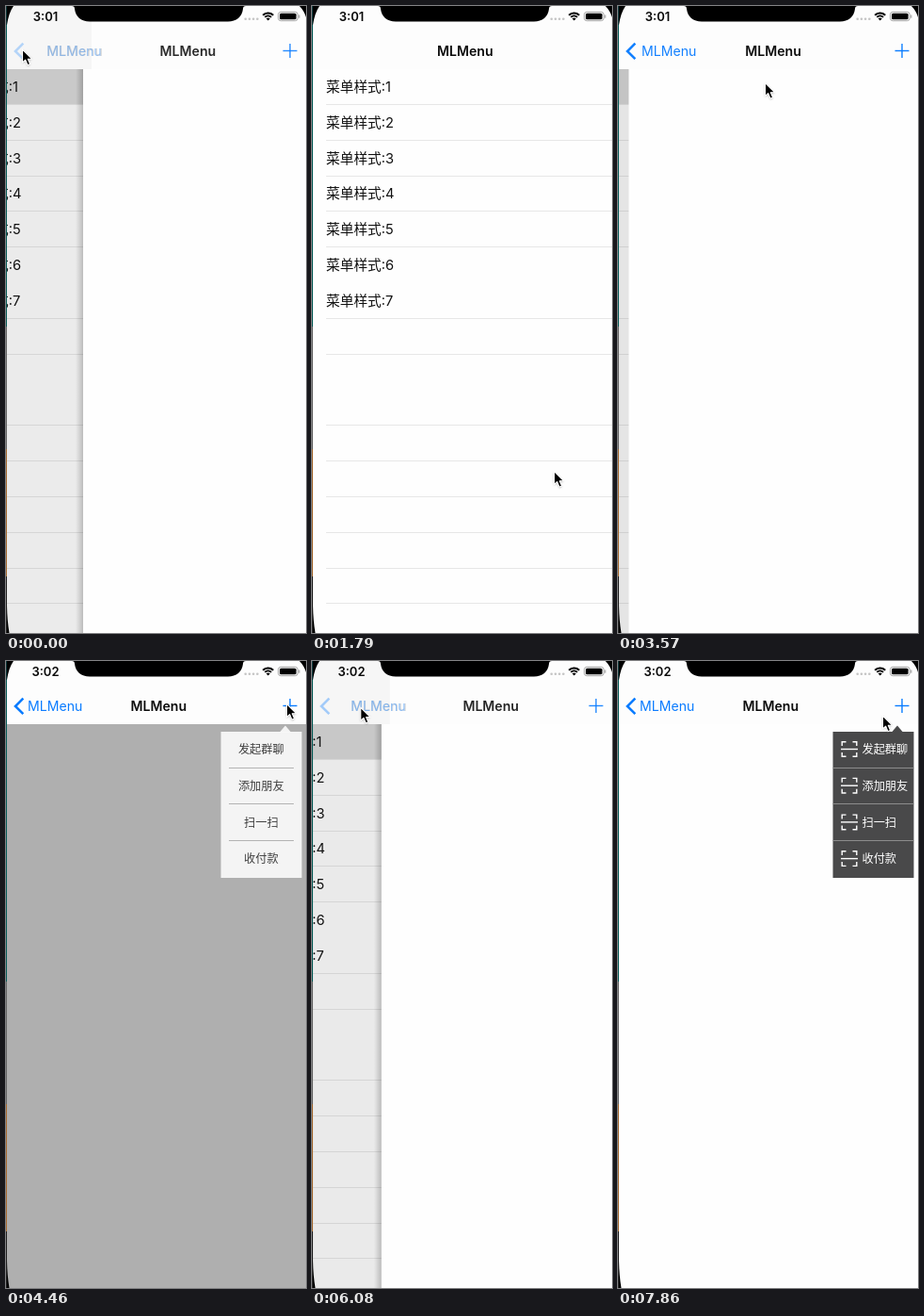
Recreate the animation shown at these times as an HTML page with a canvas. Size 319 by 665 pixels, loop 8000 ms.

```html
<!DOCTYPE html>
<html lang="zh">
<head>
<meta charset="utf-8">
<style>
html, body { margin: 0; width: 100%; height: 100%; overflow: hidden; background: #fefefe; }
canvas { display: block; width: 319px; height: 665px; }
</style>
</head>
<body>
<canvas id="stage"></canvas>
<script>
const W = 319, H = 665, BAR = 67, TOP = 66.6, ROW = 37.82;
const LOOP = 8000, TICK = 148.2;
const BLUE = '#0a7cff', INK = '#0a0a0a';
const FONT = 'Inter, "Noto Sans CJK SC", "Noto Sans CJK", sans-serif';
const ITEMS = ['发起群聊', '添加朋友', '扫一扫', '收付款'];

const canvas = document.getElementById('stage');
const dpr = window.devicePixelRatio || 1;
canvas.width = W * dpr;
canvas.height = H * dpr;
const c = canvas.getContext('2d');
c.scale(dpr, dpr);

// Page transitions: start time and direction.
const moves = [[-53.7, 'pop'], [3275, 'push'], [6026.3, 'pop'], [6765, 'push']];

// Pointer path: tick, x, y.
const path = [
  [0, 17, 45.5], [1, 20, 48], [3, 60, 70], [6, 129, 101], [7, 129, 101], [8, 257, 397],
  [12, 257, 493], [13, 254, 487], [15, 254, 487], [16, 200, 250], [17, 136, 36],
  [18, 136, 36], [20, 150, 80], [24, 156, 81], [26, 158, 81], [28, 298, 45],
  [31, 298, 45], [34, 172, 100], [36, 168, 99], [37, 168, 99], [40, 52, 49],
  [42, 50.5, 48.5], [45, 200, 116], [47, 230, 57.3], [50, 262, 52], [51, 296, 44],
  [52, 296, 44], [53, 281, 57.5]
];

const clamp = v => Math.max(0, Math.min(1, v));
const ramp = (t, a, b) => clamp((t - a) / (b - a));

function rect(x, y, w, h, color) {
  c.fillStyle = color;
  c.fillRect(x, y, w, h);
}

function poly(points, fill, stroke, width) {
  c.beginPath();
  points.forEach(([x, y], i) => i ? c.lineTo(x, y) : c.moveTo(x, y));
  if (fill) { c.closePath(); c.fillStyle = fill; c.fill(); }
  if (stroke) { c.strokeStyle = stroke; c.lineWidth = width; c.stroke(); }
}

function text(str, x, y, size, color, align = 'left', weight = 400) {
  c.font = `${weight} ${size}px ${FONT}`;
  c.textAlign = align;
  c.textBaseline = 'alphabetic';
  c.fillStyle = color;
  c.fillText(str, x, y);
}

function faded(alpha, draw) {
  if (alpha <= 0) return;
  c.save();
  c.globalAlpha = clamp(alpha);
  draw();
  c.restore();
}

// How far the detail page is moved out: 0 covers the list, 1 is gone.
function pageState(t) {
  const [start, kind] = moves.filter(m => m[0] <= t).pop();
  const u = (t - start) * 0.01826;
  const left = (1 + u) * Math.exp(-u);
  let r = kind === 'push' ? left : 1 - left;
  if (r < 0.003) r = 0;
  if (r > 0.997) r = 1;
  return { r, pop: kind === 'pop' };
}

function selection(t) {
  if (t < 3000) return [0, 1 - ramp(t, 300, 650)];
  if (t < 6610) return [0, t < 3110 ? 0 : 1 - ramp(t, 6325, 6600)];
  return [1, 1];
}

function drawList(t, r) {
  const [row, alpha] = selection(t);
  c.save();
  c.translate(-0.3 * W * (1 - r), 0);
  rect(0, BAR, W, H - BAR, '#fefefe');
  for (let i = 1; i < 16; i++) {
    if (i === 6 || i === 9) continue;
    rect(15, Math.floor(TOP + i * ROW), W - 15, 1, '#e7e7e7');
  }
  faded(alpha, () => {
    const y = Math.round(TOP + row * ROW);
    rect(0, y, W, Math.round(TOP + (row + 1) * ROW) - y, '#d9d9d9');
  });
  for (let i = 0; i < 7; i++) {
    text('菜单样式:' + (i + 1), 15, TOP + i * ROW + 24.4, 14.7, '#111');
  }
  c.restore();
  faded(0.1 * (1 - r), () => rect(0, BAR, W, H - BAR, '#000'));
}

function drawDetail(r, pop) {
  const x = r * W;
  if (pop && r > 0) {
    const g = c.createLinearGradient(x - 8, 0, x, 0);
    g.addColorStop(0, 'rgba(0,0,0,0)');
    g.addColorStop(1, 'rgba(0,0,0,0.2)');
    rect(x - 8, BAR, 8, H - BAR, g);
  }
  rect(x, BAR, W - x, H - BAR, '#fefefe');
}

function drawBar(r, pop) {
  rect(0, 0, W, BAR, '#fdfdfd');
  if (r > 0.05 && r < 0.95) rect(0, 0, r * W + 9, BAR, '#f6f6f6');

  // Bar labels trail the page; the back label turns into the list title.
  const slide = pop ? 0.7 * r + 0.3 * r ** 3 : Math.min(1, 3.6 * r ** 1.59);
  const backX = 23 + 110 * slide;
  const shown = 1 - r ** 1.5;

  faded(1 - shown, () => text('MLMenu', backX, 53, 14.1, INK, 'left', 600));
  faded(shown, () => {
    text('MLMenu', 162.3 + 168 * (pop ? slide : Math.min(1, 3.2 * r ** 1.59)), 53, 14.1, INK, 'center', 600);
    poly([[294.5, 47.5], [309.5, 47.5]], null, BLUE, 1.4);
    poly([[302, 40], [302, 55]], null, BLUE, 1.4);
  });
  faded(1 - (pop ? 2.5 : 1.1) * r, () => text('MLMenu', backX, 53, 14.1, BLUE));
  faded(1 - (pop ? 2.8 : 1.1) * r, () =>
    poly([[18.3, 39.7], [10, 48], [18.3, 56.2]], null, BLUE, 2.6));
}

function drawStatus(t) {
  text(t < 3650 ? '3:01' : '3:02', 42, 15.5, 13, INK, 'center', 600);
  for (let i = 0; i < 4; i++) {
    c.beginPath();
    c.arc(254.7 + i * 4.2, 13.8, 1.3, 0, 7);
    c.fillStyle = '#c4c4c4';
    c.fill();
  }
  for (const radius of [7.6, 4.6]) {
    c.beginPath();
    c.arc(278.7, 15, radius, -Math.PI * 0.76, -Math.PI * 0.24);
    c.strokeStyle = '#000';
    c.lineWidth = 2;
    c.stroke();
  }
  poly([[278.7, 15.6], [276.6, 13.2], [278.7, 12.4], [280.8, 13.2]], '#000');
  c.beginPath();
  c.roundRect(289.5, 6.3, 20.7, 9.4, 2.8);
  c.strokeStyle = '#a5a5a5';
  c.lineWidth = 1;
  c.stroke();
  c.beginPath();
  c.roundRect(291, 7.8, 17.6, 6.4, 1.5);
  c.fillStyle = '#000';
  c.fill();
  rect(311.2, 9.5, 1.2, 3.2, '#a5a5a5');
}

function drawCase() {
  c.fillStyle = '#000';
  c.beginPath();
  c.moveTo(70, 0);
  c.quadraticCurveTo(73, 0, 73, 3);
  c.bezierCurveTo(74, 11.5, 80, 16.5, 89, 16.5);
  c.lineTo(236, 16.5);
  c.bezierCurveTo(245, 16.5, 251, 11.5, 252, 3);
  c.quadraticCurveTo(252, 0, 255, 0);
  c.fill();

  c.beginPath();
  c.moveTo(0, 0);
  c.lineTo(8, 0);
  c.quadraticCurveTo(3, 7, 1, 20);
  c.lineTo(0, 20);
  c.moveTo(W, 0);
  c.lineTo(312, 0);
  c.quadraticCurveTo(317, 5, W, 12);
  c.moveTo(0, 636);
  c.lineTo(1, 636);
  c.quadraticCurveTo(1.3, 652, 3.5, H);
  c.lineTo(0, H);
  c.fill();

  const bands = [[0, '#0a3436'], [20, '#0b5f5b'], [340, '#6a6a6a'], [470, '#a86d33'], [605, '#222']];
  bands.forEach(([y, color], i) => {
    const end = i + 1 < bands.length ? bands[i + 1][0] : H;
    rect(0, y, 1, end - y, color);
  });
}

function scanIcon(x, y) {
  c.save();
  c.translate(x, y);
  for (const sx of [-1, 1]) for (const sy of [-1, 1]) {
    poly([[3.5 * sx, 7.8 * sy], [7.8 * sx, 7.8 * sy], [7.8 * sx, 3.5 * sy]], null, '#fff', 1.4);
  }
  poly([[-9, 0], [9, 0]], null, '#fff', 1.4);
  c.restore();
}

function drawMenu(dark) {
  const bg = dark ? '#49494a' : '#fff';
  poly([[291, 75.5], [297, 68.5], [303, 75.5]], bg);
  rect(228.5, 75, 86, 155, bg);
  ITEMS.forEach((label, i) => {
    const y = 93.5 + i * 38.7;
    if (dark) {
      scanIcon(246, y);
      text(label, 259.5, y + 4.6, 12.2, '#fff');
    } else {
      text(label, 271.3, y + 4.6, 12.2, '#222', 'center');
    }
    if (i < 3) {
      const line = Math.round(y + 19.2);
      if (dark) rect(228.5, line, 86, 1, '#8c8c8c');
      else rect(237, line, 69, 1, '#a9a9a9');
    }
  });
}

function drawMenus(t) {
  const light = ramp(t, 4240, 4480) * (1 - ramp(t, 5420, 5660));
  faded(light * 0.365, () => rect(1, BAR, W - 1, H - BAR, '#000'));
  faded(light, () => drawMenu(false));
  faded(ramp(t, 7600, 7820), () => drawMenu(true));
}

function drawPointer(k) {
  if (k > 8 && k < 12) return;
  let i = 0;
  while (i < path.length - 2 && path[i + 1][0] <= k) i++;
  const [ka, xa, ya] = path[i], [kb, xb, yb] = path[i + 1];
  const f = ramp(k, ka, kb);
  c.save();
  c.translate(xa + (xb - xa) * f, ya + (yb - ya) * f);
  const arrow = [[0.5, 0.5], [0.5, 14.5], [3.7, 11.6], [6, 17.2], [8.6, 16.1], [6.3, 10.7], [10.6, 10.6]];
  c.lineJoin = 'round';
  c.shadowColor = 'rgba(0,0,0,0.35)';
  c.shadowBlur = 2 * dpr;
  c.shadowOffsetY = dpr;
  poly(arrow, '#fff');
  c.shadowColor = 'transparent';
  poly(arrow, '#000', '#fff', 1.1);
  c.restore();
}

function draw(now) {
  const k = Math.min(53, Math.floor((now % LOOP) / TICK));
  const t = k * TICK;
  const { r, pop } = pageState(t);
  rect(0, 0, W, H, '#fefefe');
  if (r > 0) drawList(t, r);
  if (r < 1) drawDetail(r, pop);
  drawBar(r, pop);
  drawStatus(t);
  drawMenus(t);
  drawCase();
  drawPointer(k);
}

const begin = performance.now();
function loop() {
  draw(performance.now() - begin);
  requestAnimationFrame(loop);
}
loop();
</script>
</body>
</html>
```
